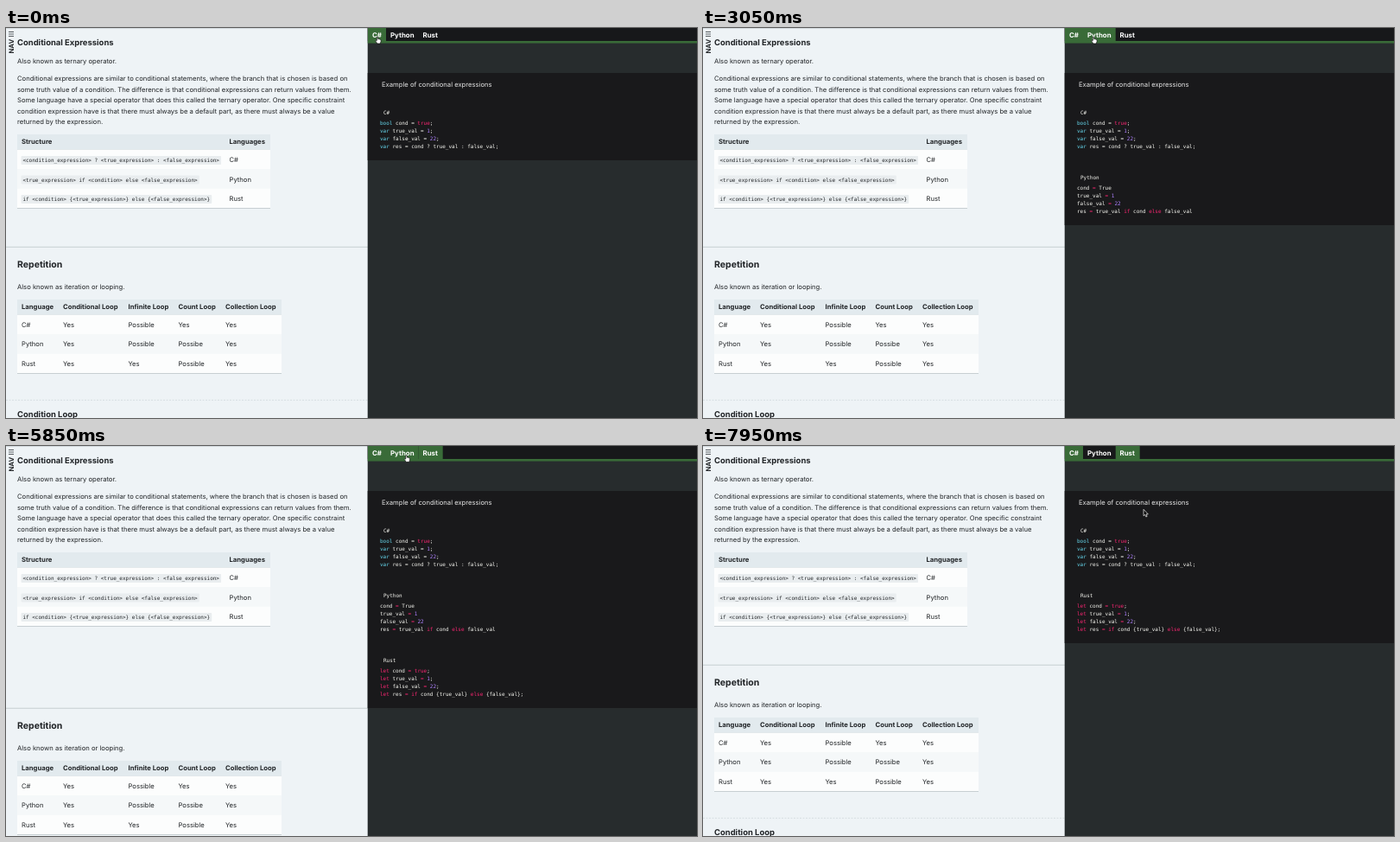
An HTML page that plays this animation: 800 px wide and 451 px high, repeating every 8 s.

```html
<!DOCTYPE html>
<html lang="en">
<head>
<meta charset="utf-8">
<title>Conditional Expressions</title>
<style>
  html, body { margin: 0; width: 100%; height: 100%; overflow: hidden; background: #272c2d; }
  svg { display: block; width: 100vw; height: 100vh; }
  text { font: 7.65px Inter, Roboto, sans-serif; fill: #212427; white-space: pre; text-rendering: geometricPrecision; }
  .b { font-weight: 700; font-size: 7.7px; }
  .h3 { font-weight: 700; font-size: 9.45px; }
  .h2 { font-weight: 700; font-size: 10.5px; }
  .tab { font-weight: 700; font-size: 7.9px; fill: #fff; }
  .title { fill: #e6e6e6; }
  .m { font: 6px "DejaVu Sans Mono", "Liberation Mono", monospace; }
  .code { fill: #f8f8f2; }
  .k { fill: #66d9ef; }
  .p { fill: #f92672; }
  .n { fill: #ae81ff; }
</style>
</head>
<body>
<svg id="stage" viewBox="0 0 800 451" preserveAspectRatio="none"></svg>
<script>
const stage = document.getElementById("stage");
const LOOP = 8000;

function add(parent, tag, attrs = {}, content = "") {
  const el = document.createElementNS("http://www.w3.org/2000/svg", tag);
  for (const key in attrs) el.setAttribute(key, attrs[key]);
  el.textContent = content;
  return parent.appendChild(el);
}
const group = parent => add(parent, "g");
const rect = (g, x, y, width, height, fill) => add(g, "rect", { x, y, width, height, fill });
const label = (g, x, y, str, cls = "") => add(g, "text", { x, y, class: cls }, str);

// Table shell: header band, three striped rows, bottom rule
function grid(g, y, width) {
  rect(g, 13, y, width, 17.5, "#e2eaee");
  ["#fcfdfd", "#f5f8f9", "#fcfdfd"].forEach((c, i) => rect(g, 13, y + 17.5 + i * 22.5, width, 22.5, c));
  rect(g, 13, y + 17.3, width, 0.5, "#d3dbdf");
  rect(g, 13, y + 85, width, 0.9, "#c3cbcf");
}

// Left page
rect(stage, 0, 0, 419, 451, "#eef3f6");
const page = group(stage);
rect(page, 0, 0, 419, 0.5, "#b3bcc1");
label(page, 13, 19.6, "Conditional Expressions", "h3");
label(page, 13, 40.8, "Also known as ternary operator.");
[
  "Conditional expressions are similar to conditional statements, where the branch that is chosen is based on",
  "some truth value of a condition. The difference is that conditional expressions can return values from them.",
  "Some language have a special operator that does this called the ternary operator. One specific constraint",
  "condition expression have is that there must always be a default part, as there must always be a value",
  "returned by the expression."
].forEach((line, i) => label(page, 13, 61.3 + i * 12.5, line));

grid(page, 123, 293);
label(page, 18, 134.3, "Structure", "b");
label(page, 258.5, 134.3, "Languages", "b");
[
  ["<condition_expression> ? <true_expression> : <false_expression>", "C#"],
  ["<true_expression> if <condition> else <false_expression>", "Python"],
  ["if <condition> {<true_expression>} else {<false_expression>}", "Rust"]
].forEach(([code, lang], i) => {
  const y = 155.2 + i * 22.5;
  add(page, "rect", { x: 17.5, y: y - 7.2, width: code.length * 3.612 + 4, height: 10, rx: 1, fill: "#e9edef" });
  label(page, 19.4, y, code, "m");
  label(page, 258.5, y, lang);
});

const nav = group(page);
[4, 6.6, 9.2].forEach(y => rect(nav, 3, y, 6, 0.8, "#33383b"));
add(nav, "text", { transform: "translate(9 29.6) rotate(-90)", class: "b" }, "NAV");

// Section that moves down when the code panel grows
const section = group(stage);
rect(section, 0, 252.8, 419, 0.8, "#bcc5c9");
label(section, 13, 277, "Repetition", "h2");
label(section, 13, 302.2, "Also known as iteration or looping.");
grid(section, 314, 306);
const cols = [18, 66, 141.5, 199.5, 254];
[
  ["Language", "Conditional Loop", "Infinite Loop", "Count Loop", "Collection Loop"],
  ["C#", "Yes", "Possible", "Yes", "Yes"],
  ["Python", "Yes", "Possible", "Possibe", "Yes"],
  ["Rust", "Yes", "Yes", "Possible", "Yes"]
].forEach((row, r) => row.forEach((cell, c) =>
  label(section, cols[c], r ? 323.1 + r * 22.5 : 325.2, cell, r ? "" : "b")));
add(section, "path", { d: "M0 430.3H419", stroke: "#ccd4d8", "stroke-width": 0.7, "stroke-dasharray": "2 1.5" });
label(section, 13, 449.6, "Condition Loop", "h3");

// Right side
rect(stage, 418.7, 0, 381.3, 451, "#272c2d");
rect(stage, 418.7, 0, 381.3, 15, "#17181a");
rect(stage, 418.7, 15, 381.3, 2.6, "#396b38");
const panel = rect(stage, 418.7, 52, 381.3, 101, "#19191b");
label(stage, 435, 67.8, "Example of conditional expressions", "title");

// Markup in code lines: ~k word~ colours a word
const langs = [
  { name: "C#", x: 419, w: 21, tx: 424, lines: [
    "~k bool~ cond = ~p true~;", "~k var~ true_val = ~n 1~;", "~k var~ false_val = ~n 22~;",
    "~k var~ res = cond ? true_val : false_val;"] },
  { name: "Python", x: 440, w: 37.7, tx: 445, lines: [
    "cond ~p =~ True", "true_val ~p =~ ~n 1~", "false_val ~p =~ ~n 22~",
    "res ~p =~ true_val ~p if~ cond ~p else~ false_val"] },
  { name: "Rust", x: 477.7, w: 28, tx: 482.5, lines: [
    "~p let~ cond ~p =~ ~p true~;", "~p let~ true_val ~p =~ ~n 1~;", "~p let~ false_val ~p =~ ~n 22~;",
    "~p let~ res ~p =~ ~p if~ cond {true_val} ~p else~ {false_val};"] }
];
for (const lang of langs) {
  lang.tab = rect(stage, lang.x, 0, lang.w, 15.2, "#396b38");
  label(stage, lang.tx, 10.6, lang.name, "tab");
  lang.block = group(stage);
  label(lang.block, 437, 99.6, lang.name, "m code");
  lang.lines.forEach((line, i) => {
    const row = label(lang.block, 433, 111.6 + i * 9, "", "m code");
    line.split("~").forEach((part, j) =>
      add(row, "tspan", j % 2 ? { class: part[0] } : {}, j % 2 ? part.slice(2) : part));
  });
}

// Pointer shapes, centred on 0,0
const pointer = group(stage);
const outline = (fill, stroke) => ({ fill, stroke, "stroke-width": 0.7, "stroke-linejoin": "round" });
const shapes = {
  hand: add(pointer, "path", { ...outline("#fff", "#111"),
    d: "M-1.7 -3.4Q-1 -4.3 -.3 -3.4V-1.2Q.3 -1.7 .8 -1Q1.5 -1.4 2 -.7Q2.9 -1 3.1 0V1.6L2.3 4H-1.2L-3.3 .9Q-3 -.3 -1.7 .6Z" }),
  arrow: add(pointer, "path", { ...outline("#000", "#fff"),
    d: "M-2.4 -4.2V3.2L-.8 1.8L.4 4.4L1.6 3.9L.5 1.4H2.8Z" }),
  beam: group(pointer)
};
[["#fff", 1.7], ["#000", 0.8]].forEach(([stroke, w]) => add(shapes.beam, "path", {
  d: "M-2 -4.6Q0 -4.6 0 -3.4Q0 -4.6 2 -4.6M0 -3.4V3.4M-2 4.6Q0 4.6 0 3.4Q0 4.6 2 4.6M-1 1.5H1",
  fill: "none", stroke, "stroke-width": w }));

// time, x, y
const path = [
  [0, 431, 14], [1900, 431, 14], [2050, 453, 14], [3400, 453, 14], [3650, 489.5, 13.5],
  [5300, 489.5, 13.5], [5550, 464.5, 14.5], [6150, 464.5, 14.5], [6600, 490, 190], [7000, 490, 190],
  [7350, 574, 150], [7800, 535, 98], [7950, 512.5, 77.5], [LOOP, 512.5, 77.5]
];
// time, languages shown
const states = [[0, "C#"], [2050, "C# Python"], [4150, "C# Python Rust"], [6000, "C# Rust"]];

function place(t) {
  const i = path.findIndex(p => p[0] > t);
  const [t0, x0, y0] = path[i - 1], [t1, x1, y1] = path[i];
  const u = (t - t0) / (t1 - t0), e = u * u * (3 - 2 * u);
  return [x0 + (x1 - x0) * e, y0 + (y1 - y0) * e];
}

function draw(t) {
  const on = states.filter(s => s[0] <= t).pop()[1].split(" ");
  for (const { name, tab, block } of langs) {
    const slot = on.indexOf(name);
    const display = slot < 0 ? "none" : "";
    tab.style.display = block.style.display = display;
    block.setAttribute("transform", `translate(0 ${75 * Math.max(slot, 0)})`);
  }
  const end = 78 + 75 * on.length;
  panel.setAttribute("height", end - 52);
  section.setAttribute("transform", `translate(0 ${Math.max(0, end - 253)})`);

  const [x, y] = place(t);
  const kind = y < 18 ? "hand" : y > 104 ? "beam" : "arrow";
  for (const key in shapes) shapes[key].style.display = key === kind ? "" : "none";
  pointer.setAttribute("transform", `translate(${x} ${y})`);
}

const start = performance.now();
function tick() {
  draw((performance.now() - start) % LOOP);
  requestAnimationFrame(tick);
}
tick();
</script>
</body>
</html>
```
